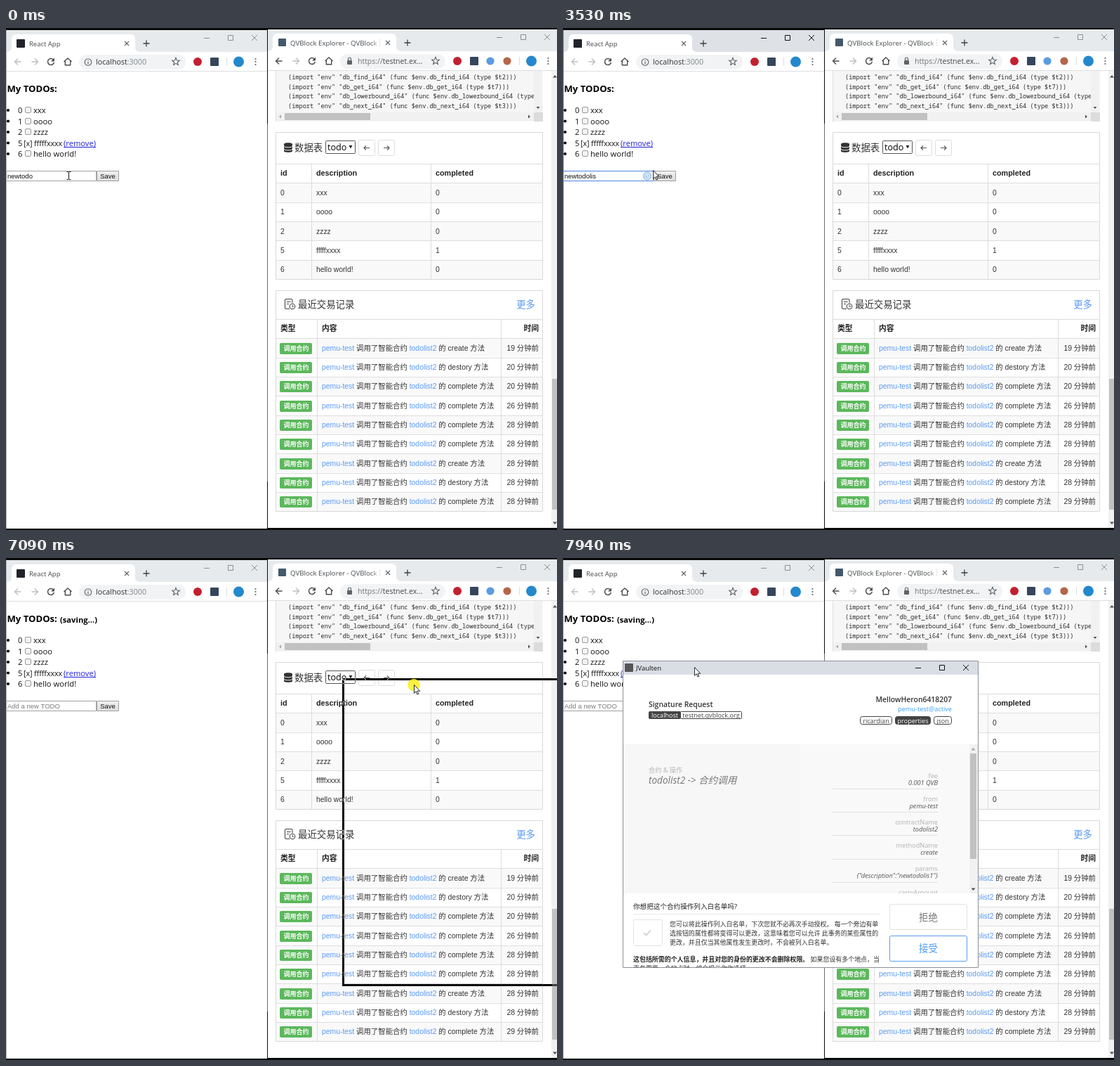
Animation, 785 px wide and 714 px high, one loop 8000 ms. Source, as an HTML page with a canvas:

```html
<!DOCTYPE html>
<html lang="zh">
<head>
<meta charset="utf-8">
<title>Todo demo</title>
<style>
html, body { margin: 0; width: 100%; height: 100%; overflow: hidden; background: #000; }
canvas { display: block; }
</style>
</head>
<body>
<canvas id="stage" width="785" height="714"></canvas>
<script>
const c = document.getElementById('stage').getContext('2d');
const LOOP = 8000;
const UI = '"Open Sans", "Noto Sans CJK SC", "Noto Sans CJK", sans-serif';
const ARIAL = '"Liberation Sans", "Noto Sans CJK SC", "Noto Sans CJK", sans-serif';
const MONO = '"Noto Sans Mono", monospace';
const LINK = '#5b9af5';
const USER = 'pemu-test';

// Drawing helpers
function box(x, y, w, h, fill) {
  c.fillStyle = fill;
  c.fillRect(x, y, w, h);
}
function frame(x, y, w, h, color, r = 0, fill) {
  c.beginPath();
  c.roundRect(x + .5, y + .5, w - 1, h - 1, r);
  if (fill) { c.fillStyle = fill; c.fill(); }
  c.strokeStyle = color;
  c.lineWidth = 1;
  c.stroke();
}
function pill(x, y, w, h, r, fill) {
  c.beginPath();
  c.roundRect(x, y, w, h, r);
  c.fillStyle = fill;
  c.fill();
}
function disc(x, y, r, fill) {
  c.beginPath();
  c.arc(x, y, r, 0, 7);
  c.fillStyle = fill;
  c.fill();
}
function ring(x, y, r, color, w = 1) {
  c.beginPath();
  c.arc(x, y, r, 0, 7);
  c.lineWidth = w;
  c.strokeStyle = color;
  c.stroke();
}
function path(d, color, w = 1, x = 0, y = 0) {
  c.save();
  c.translate(x, y);
  c.strokeStyle = color;
  c.lineWidth = w;
  c.stroke(new Path2D(d));
  c.restore();
}
function shape(d, fill, x, y) {
  c.save();
  c.translate(x, y);
  c.fillStyle = fill;
  c.fill(new Path2D(d));
  c.restore();
}
// Baselines sit on whole pixels to keep small text crisp
function text(s, x, y, size, color = '#222', family = UI, style = '', align = 'left') {
  c.font = `${style} ${size}px ${family}`;
  c.textAlign = align;
  c.fillStyle = color;
  c.fillText(s, x, Math.round(y));
  return c.measureText(s).width;
}
function clip(x, y, w, h, draw) {
  c.save();
  c.beginPath();
  c.rect(x, y, w, h);
  c.clip();
  draw();
  c.restore();
}

// Timelines: the last entry that has started holds
const at = (track, t) => track.findLast(e => e[0] <= t);

const cursorTrack = [
  [0, 89, 210, 'beam'], [164, 93, 210, 'beam'], [248, 98, 210, 'beam'],
  [332, 104, 210, 'beam'], [416, 109, 209, 'beam'], [500, 115, 207, 'arrow'],
  [640, 119, 206, 'arrow'], [715, 124, 204, 'arrow'], [790, 128, 202, 'arrow'],
  [3910, 130, 204, 'arrow'], [3989, 135, 207, 'arrow'], [4067, 141, 210, 'arrow'],
  [4146, 147, 213, 'arrow'], [4225, 151, 215, 'arrow'],
  [5700, 290, 198, 'arrow'], [5775, 557, 167, 'arrow'], [5850, 0, 0, 'none']
];
const dragTrack = [
  [7090, 479, 171], [7166, 365, 148], [7241, 270, 126], [7317, 195, 108],
  [7390, 136, 99], [7469, 95, 91], [7544, 78, 112], [7620, 85, 145]
];
const typing = [
  [0, 'newtodo', ''], [2120, 'newtodo', 'l'], [2280, 'newtodo', 'li'],
  [2510, 'newtodo', "li's"], [2980, 'newtodolis', ''], [3760, 'newtodolis1', '']
];
const caretTrack = [
  [0, false], [80, true], [640, false], [1180, true], [1730, false],
  [2120, true], [3530, false], [3760, true], [4303, false]
];
const imeTrack = [
  [2120, 41, '了 来 里 老 两 李 路'],
  [2350, 43, '里 李 力 离 利 理 立'],
  [2510, 46, '历史 利说 理事 隶属 里斯 历时 丽水'],
  [2980, 0, '']
];

function windowButtons(x, y, step, color) {
  path('M-4 .5H4', color, 1, x, y);
  path('M-3.5-3.5H3.5V3.5H-3.5Z', color, 1, x + step, y);
  path('M-4-4L4 4M4-4L-4 4', color, 1, x + 2 * step, y);
}

function star(x, y) {
  let d = '';
  for (let i = 0; i < 10; i++) {
    const r = i % 2 ? 2.4 : 5.6, a = i * Math.PI / 5;
    d += (i ? 'L' : 'M') + r * Math.sin(a) + ' ' + -r * Math.cos(a);
  }
  path(d + 'Z', '#5f6368', 1.1, x, y);
}

// Tab strip and toolbar, shared by both windows; o.star and the like are local x positions
function browser(x, y, w, o) {
  c.save();
  c.translate(x, y);
  box(0, 0, w, 709, '#fff');
  box(0, 0, w, 31, o.strip);
  shape('M0 31Q7 31 7 24V13Q7 6 14 6H176Q183 6 183 13V24Q183 31 190 31Z', '#fff', 1, 0);
  pill(o.icon[0], 13, o.icon[1], o.icon[1], 1, o.icon[2]);
  clip(0, 6, 164, 24, () => text(o.title, 33, 23, o.titleSize, '#45494d'));
  if (o.fade) {
    const g = c.createLinearGradient(148, 0, 163, 0);
    g.addColorStop(0, '#fff0');
    g.addColorStop(1, '#fff');
    box(148, 9, 16, 20, g);
  }
  path('M-3-3L3 3M3-3L-3 3', '#5f6368', 1.2, 172, 19);
  path('M-4.5 0H4.5M0-4.5V4.5', '#3c4043', 1.3, 200, 19);
  windowButtons(w - 86, 11, 34, o.buttons);

  path('M4.5 0H-4.5M0-4.5L-4.5 0L0 4.5', o.back, 1.4, 17, 45);
  path('M-4.5 0H4.5M0-4.5L4.5 0L0 4.5', '#bcbfc2', 1.4, 41, 45);
  path('M3.2-3.2A4.5 4.5 0 1 0 4.4 1', '#4a4d51', 1.5, 64, 45);
  shape('M5-5.5V-.5H0Z', '#4a4d51', 64, 45);
  path('M-5.5 0L0-5L5.5 0M-3.7-1V4.7H3.7V-1', '#4a4d51', 1.4, 88, 45);
  pill(104, 35, o.star - 90, 21, 10.5, '#f1f3f4');
  o.address();
  star(o.star, 45);
  disc(o.star + 31, 45, 6, '#c3202f');
  pill(o.star + 49, 39, 12, 12, 1, '#35465c');
  o.extras.forEach((color, i) => disc(o.star + 78 + i * 24, 45, 5.6, color));
  box(w - 58, 39, 1, 12, '#dadce0');
  disc(w - 40.5, 45, 7.5, '#2488cc');
  for (const dy of [-4, 0, 4]) disc(w - 16.5, 45 + dy, 1.1, '#5f6368');
  box(0, 58, w, 1, '#dcdee1');
  c.restore();
}

function todoWindow(t) {
  const active = t >= 80 && t < 4850;
  const saving = t >= 4460;
  browser(0, 3, 372, {
    strip: t >= 80 && t < 5160 ? '#dee1e6' : '#e7eaed',
    icon: [15, 12, '#20232a'], title: 'React App', titleSize: 9.5,
    buttons: active ? '#111' : '#8b8e92', back: '#bcbfc2', star: 242, extras: [],
    address() {
      ring(117, 45.5, 4.8, '#5f6368', 1.1);
      path('M0-2.6V-1.4M0-.4V2.7', '#5f6368', 1.2, 117, 45.5);
      const w = text('localhost', 128, 49, 10.7, '#303338');
      text(':3000', 128 + w, 49, 10.7, '#80868b');
    }
  });
  box(0, 3, 1, 709, active ? '#777' : '#b5b5b5');

  text('My TODOs:', 1.5, 91, 13.1, '#000', UI, 'bold');
  if (saving) text('(saving...)', 77, 91.5, 11.2, '#000', UI, 'bold');
  const items = [[0, 'xxx'], [1, 'oooo'], [2, 'zzzz'], [5, 'fffffxxxx'], [6, 'hello world!']];
  items.forEach(([id, label], i) => {
    const y = 121 + i * 15.5, done = id === 5;
    disc(3, y - 4, 2.1, '#000');
    text(id, 17, y, 11.2, '#111');
    if (done) {
      text('[x]', 25, y, 10.6, '#111');
      text(label, 40, y, 10.6, '#111');
      const w = text('(remove)', 82, y, 11.2, '#2222e0');
      box(82, Math.round(y + 1), w, 1, '#2222e0');
    } else {
      frame(27, Math.round(y - 9), 9, 9, '#999', 1.5, '#f4f4f4');
      text(label, 39, y, 11.2, '#111');
    }
  });

  const focus = t >= 80 && t < 4303;
  frame(0, 203, 129, 15, focus ? '#4a86d8' : '#a2a2a2', 0, '#fff');
  if (focus) {
    disc(120, 210.5, 6.2, '#a8cbed');
    ring(120, 210.5, 3.6, '#fff');
    path('M0-2.4V.5H2', '#fff', 1, 120, 210.5);
  }
  if (saving) {
    text('Add a new TODO', 2, 214, 9.5, '#7b7b7b', ARIAL);
  } else {
    const [, base, comp] = at(typing, t);
    const w = text(base, 2, 214, 9.5, '#111', ARIAL);
    const cw = comp ? text(comp, 2 + w, 214, 9.5, '#111', ARIAL) : 0;
    if (comp) box(2 + w, 215, cw, 1, '#111');
    if (at(caretTrack, t)[1]) box(Math.round(2 + w + cw), 205, 1, 11, '#000');
  }
  const hover = t >= 3989 && t < 5700;
  const g = c.createLinearGradient(0, 203, 0, 218);
  g.addColorStop(0, '#f2f2f2');
  g.addColorStop(1, '#dcdcdc');
  frame(129, 203, 32, 15, hover ? '#777' : '#a0a0a0', 0, g);
  text('Save', 145, 214, 9.5, '#111', ARIAL, '', 'center');
}

function codePane() {
  box(384, 61, 381, 72, '#f6f6f6');
  clip(385, 61, 367, 59, () => {
    [['find', '2'], ['get', '7'], ['lowerbound', '5'], ['next', '3']].forEach(([fn, type], i) => {
      const name = `db_${fn}_i64`;
      text(`(import "env" "${name}" (func $env.${name} (type $t${type})))`,
        402, 73 + i * 13.5, 8.62, '#2b2b2b', MONO);
    });
  });
  box(385, 120, 367, 12, '#f1f1f1');
  box(397, 121, 122, 10, '#c1c1c1');
  box(752, 61, 12, 59, '#f1f1f1');
  box(752, 120, 13, 13, '#dcdcdc');
  shape('M2-2.5V2.5L-1 0Z', '#a3a3a3', 390, 126);
  shape('M-2-2.5V2.5L1 0Z', '#505050', 746, 126);
  shape('M-2.5-1H2.5L0 2Z', '#505050', 758, 113);
  box(384, 61, 1, 72, '#ddd');
}

// Bordered card holding a striped table
function card(y, headH, rows, cols) {
  const step = 27.33, top = y + headH;
  for (let i = 0; i <= rows; i++) {
    const ry = Math.round(top + i * step);
    if (i % 2) box(385, ry, 379, Math.round(step), '#f9f9f9');
    box(384, ry, 381, 1, '#ddd');
  }
  const h = Math.round(headH + (rows + 1) * step);
  for (const x of cols) box(x, top, 1, h - headH, '#ddd');
  frame(384, y, 381, h + 1, '#d8d8d8');
}

function dataCard() {
  card(148, 45, 5, [435, 605]);
  const ink = '#333';
  for (const dy of [0, 4, 8]) {
    shape('M0 2C0-.5 12-.5 12 2V4C12 6.5 0 6.5 0 4Z', ink, 396, 163 + dy);
    if (dy) path('M0 2C0 4 12 4 12 2', '#fff', .9, 396, 162.3 + dy);
  }
  text('数据表', 411, 175, 13.4, ink);
  frame(455, 160, 43, 19, '#555', 1, '#fff');
  text('todo', 458, 174, 12.6, '#000');
  shape('M-2.5-2H2.5L0 2.5Z', '#222', 491, 169);
  frame(502, 159, 24, 23, '#ddd', 2, '#fff');
  frame(530, 159, 24, 23, '#ddd', 2, '#fff');
  path('M4 0H-4M-1-3L-4 0L-1 3', '#555', 1.1, 514, 170.5);
  path('M-4 0H4M1-3L4 0L1 3', '#555', 1.1, 542, 170.5);

  const row = (y, cells, size, style) => [391, 442, 612].forEach((x, i) =>
    text(cells[i], x, y, size, style ? '#222' : ink, ARIAL, style));
  row(210, ['id', 'description', 'completed'], 10.8, 'bold');
  const data = [[0, 'xxx', 0], [1, 'oooo', 0], [2, 'zzzz', 0], [5, 'fffffxxxx', 1], [6, 'hello world!', 0]];
  data.forEach((cells, i) => row(238 + i * 27.33, cells, 10.4, ''));
}

function logCard(t) {
  card(373, 41, 9, [443, 705]);
  path('M7 14.5H2Q.5 14.5 .5 13V2Q.5 .5 2 .5H9Q11 .5 11 2V6M3 4.5H8.5M3 7.5H6', '#444', 1.1, 397, 385);
  ring(408, 396, 3.8, '#444', 1.1);
  path('M0-2V.3H2', '#444', 1, 408, 396);
  text('最近交易记录', 416, 398, 13.4, '#333');
  text('更多', 754, 398, 13.4, LINK, UI, '', 'right');
  text('类型', 391, 431, 10.8, '#222', ARIAL, 'bold');
  text('内容', 450, 431, 10.8, '#222', ARIAL, 'bold');
  text('时间', 759, 431, 10.8, '#222', ARIAL, 'bold', 'right');

  const methods = ['create', 'destory', 'complete', 'complete', 'complete', 'complete', 'create', 'destory', 'complete'];
  const ages = [19, 20, 20, 26, 28, 28, 28, 28, t < 3130 ? 28 : 29];
  methods.forEach((m, i) => {
    const y = Math.round(458.6 + i * 27.33);
    pill(390, y - 11, 46, 16, 2, '#5cb85c');
    text('调用合约', 413.5, y, 9, '#fff', ARIAL, 'bold', 'center');
    let x = 450;
    for (const [s, color] of [[USER, LINK], [' 调用了智能合约 ', '#333'], ['todolist2', LINK], [` 的 ${m} 方法`, '#333']])
      x += text(s, x, y, 10.4, color, ARIAL);
    text(`${ages[i]} 分钟前`, 759, y, 10.4, '#333', ARIAL, '', 'right');
  });
}

function explorerWindow(t) {
  browser(372, 2, 417, {
    strip: '#e7eaed', icon: [16, 11, '#44586c'], title: 'QVBlock Explorer - QVBlock 区',
    titleSize: 9.7, fade: true, buttons: '#8b8e92', back: '#4a4d51',
    star: 240, extras: ['#5b9be0', '#b5654a'],
    address() {
      pill(114, 44, 7, 6, 1, '#5f6368');
      path('M-2 0V-2A2 2 0 0 1 2-2V0', '#5f6368', 1.2, 117.5, 44);
      const w = text('https://', 129, 49, 10.5, '#70757a');
      text('testnet.ex...', 129 + w, 49, 10.5, '#45494d');
    }
  });
  codePane();
  dataCard();
  logCard(t);
  box(777, 61, 8, 650, '#f1f1f1');
  box(778, 499, 7, 186, '#c1c1c1');
  shape('M-3 1.5H3L0-2Z', '#505050', 782, 69);
  shape('M-3-1.5H3L0 2Z', '#505050', 782, 704);
  // Gap between the windows, with the dark desktop behind it
  box(372, 0, 1, 714, '#0a0a0a');
  box(372, 136, 1, 509, '#6a6a6a');
}

function ime(t) {
  const now = at(imeTrack, t);
  if (!now || !now[1]) return;
  const [, x, list] = now, words = list.split(' ');
  const cell = 31 + 13 * words[0].length, w = cell * 7 + 34;
  frame(x, 219, w, 33, '#777', 0, '#fff');
  box(x + 1, 220, cell, 31, '#586b5d');
  words.forEach((word, i) => {
    const wx = x + 13 + i * (cell - .15);
    text(i + 1, wx, 240, 8, i ? '#777' : '#fff');
    text(word, wx + 7.5, 241, 13, i ? '#111' : '#fff');
  });
  const sx = x + w - 17;
  box(sx - 17, 220, 1, 31, '#777');
  ring(sx, 236, 6, '#333', 1.1);
  disc(sx - 2.2, 234.5, .9, '#333');
  disc(sx + 2.2, 234.5, .9, '#333');
  path('M-3 1.5Q0 5 3 1.5', '#333', 1, sx, 236);
}

function tag(s, x, y, w, h, dark, r) {
  frame(x, y, w, h, '#444', r, dark ? '#444' : '#fff');
  text(s, x + w / 2, y + h - 2.5, 9.1, dark ? '#fff' : '#444', UI, '', 'center');
}

function walletWindow() {
  box(85, 146, 507, 437, '#fff');
  box(85, 146, 507, 20, '#d9dee4');
  pill(88, 150, 12, 12, 1, '#555');
  text('JVaulten', 104, 160, 9.5, '#111');
  windowButtons(506, 156, 34, '#111');

  text('Signature Request', 122, 212, 10.4, '#333', UI, '600');
  tag('localhost', 122, 218, 46, 11, true, 1);
  tag('testnet.qvblock.org', 167, 218, 88, 11, false, 1);
  text('MellowHeron6418207', 554, 205, 10.4, '#333', UI, '600', 'right');
  text(USER + '@active', 554, 218, 9.2, '#3a9cf0', UI, '', 'right');
  tag('ricardian', 423, 225, 46, 12, false, 3);
  tag('properties', 473, 225, 51, 12, true, 3);
  tag('json', 528, 225, 26, 12, false, 3);

  box(86, 265, 493, 212, '#f7f7f7');
  box(338, 265, 241, 212, '#f9f9f9');
  text('合约 & 操作', 122, 305, 9.2, '#b4b4b4');
  text('todolist2 -> 合约调用', 122, 321, 13.6, '#777', UI, 'italic');
  const fields = [
    ['fee', '0.001 QVB'], ['from', USER], ['contractName', 'todolist2'], ['methodName', 'create'],
    ['params', '{"description":"newtodolis1"}'], ['carryAmount', '']
  ];
  clip(86, 265, 493, 212, () => fields.forEach(([name, value], i) => {
    const y = i * 33.2;
    text(name, 534, 312.5 + y, 9.2, '#b0b0b0', UI, '', 'right');
    text(value, 534, 322.5 + y, 9.2, '#555', UI, 'italic', 'right');
    box(384, Math.round(328 + y), 150, 1, '#e2e2e2');
  }));
  box(579, 265, 12, 212, '#f1f1f1');
  box(580, 278, 9, 150, '#c1c1c1');
  shape('M-3 1.5H3L0-2Z', '#a3a3a3', 584.5, 272);
  shape('M-3-1.5H3L0 2Z', '#505050', 584.5, 471);

  text('你想把这个合约操作列入白名单吗?', 100, 499, 9.6, '#222');
  box(100, 506, 351, 1, '#e8e8e8');
  frame(100, 514, 42, 38, '#e2e2e2', 2, '#fff');
  path('M-5 0L-1.5 3.5L5-3.5', '#d6d6d6', 2, 120, 533);
  [
    '您可以将此操作列入白名单，下次您就不必再次手动授权。 每一个旁边有单',
    '选按钮的属性都将变得可以更改，这意味着您可以允许 此事务的某些属性的',
    '更改，并且仅当其他属性发生更改时，不会被列入白名单。'
  ].forEach((s, i) => text(s, 152, 523.5 + i * 13.2, 8.95, '#333'));
  clip(86, 560, 505, 22, () => {
    const w = text('这包括所需的个人信息，并且对您的身份的更改不会删除权限。', 100, 574, 8.95, '#222', UI, 'bold');
    text(' 如果您设有多个地点，当', 100 + w, 574, 8.95, '#333');
    text('事务需要一个地点时，将会提示你你选择', 100, 587, 8.95, '#333');
  });
  frame(465, 492, 111, 37, '#e2e2e2', 2, '#fff');
  text('拒绝', 520.5, 516, 13.4, '#777', UI, '', 'center');
  frame(465, 537, 111, 37, '#5a9cf0', 2, '#fff');
  text('接受', 520.5, 560, 13.4, '#4a9af0', UI, '', 'center');
  frame(85, 146, 507, 437, '#8a9097');
}

function pointer(x, y, kind) {
  if (kind === 'beam') {
    path('M-3-5.5H-.8L0-5L.8-5.5H3M0-5V5M-3 5.5H-.8L0 5L.8 5.5H3', '#111', 1, x + .5, y);
  } else if (kind === 'arrow') {
    const d = 'M.5 .5V12.3L3.2 9.8L5 14L6.8 13.2L5 9.2H8.7Z';
    shape(d, '#fff', x, y);
    path(d, '#111', .9, x, y);
  }
}

function draw(t) {
  box(0, 0, 785, 714, '#0a0a0a');
  todoWindow(t);
  explorerWindow(t);
  ime(t);
  const drag = at(dragTrack, t);
  if (!drag) {
    const [, x, y, kind] = at(cursorTrack, t);
    pointer(x, y, kind);
  } else if (t < 7940) {
    // The drag outline inverts whatever lies below it
    const [, x, y] = drag;
    c.globalCompositeOperation = 'difference';
    c.strokeStyle = '#fff';
    c.lineWidth = 3;
    c.strokeRect(x + 1.5, y + 1.5, 504, 435);
    c.globalCompositeOperation = 'source-over';
    disc(x + 102, y + 9.5, 8.7, 'rgba(255, 238, 30, .85)');
    pointer(x + 102, y + 9, 'arrow');
  } else {
    walletWindow();
    pointer(187, 155, 'arrow');
  }
}

const start = performance.now();
function tick() {
  draw((performance.now() - start) % LOOP);
  requestAnimationFrame(tick);
}
tick();
</script>
</body>
</html>
```
